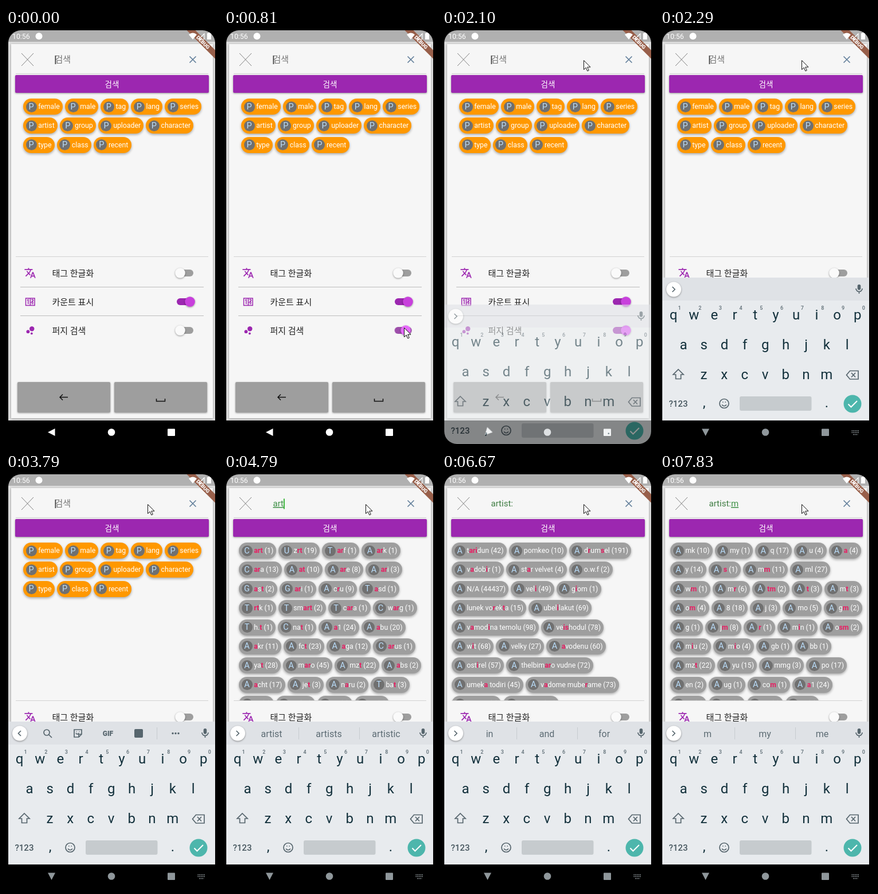
An HTML page for the animation above (8000 ms loop, 370 by 725 pixels).

```html
<!DOCTYPE html>
<html lang="ko">
<head>
<meta charset="utf-8">
<title>Tag search</title>
<style>
html, body { margin: 0; width: 100%; height: 100%; overflow: hidden; background: #000; }
body { font-family: Roboto, 'Noto Sans CJK KR', 'Noto Sans CJK', sans-serif; }
#device { position: absolute; left: 4px; top: 4px; width: 361px; height: 721px; border-radius: 22px; overflow: hidden; }
#stage { position: absolute; left: -4px; top: -4px; width: 370px; height: 725px; }
svg { position: absolute; left: 0; top: 0; }
.card { position: absolute; left: 9px; top: 28px; width: 352px; height: 652px; background: #f6f6f6; box-shadow: 0 1px 4px rgba(0,0,0,.3); }
.back { position: absolute; left: 4px; top: 24px; width: 361px; height: 660px; background: #dedede; overflow: hidden; }
.back .card { left: 5px; top: 4px; }
.raised { filter: drop-shadow(0 1px 1.5px rgba(0,0,0,.4)); }
.line { fill: none; stroke-linecap: butt; }

#lists { position: absolute; left: 9px; top: 116px; width: 352px; height: 282px; overflow: hidden; }
.list { position: absolute; top: 7px; white-space: nowrap; font-size: 12.3px; color: #fff; }
.row { display: flex; height: 33.4px; }
.chip { position: relative; height: 28px; line-height: 28px; padding: 0 5.2px 0 26.2px; margin-right: 4px; border-radius: 14px; background: #9e9e9e; box-shadow: 0 2px 4px rgba(0,0,0,.32); }
.tags .chip { background: #ff9800; }
.chip i { position: absolute; left: 4.5px; top: 4.5px; width: 19px; height: 19px; line-height: 19px; border-radius: 50%; background: #707070; color: #bbdefb; font-size: 14.5px; font-style: normal; text-align: center; }
.chip b { color: #e91e63; }

.key { font-size: 24px; text-anchor: middle; fill: #12303b; }
.num { font-size: 9px; font-weight: 500; text-anchor: middle; fill: #5c6b73; }
.tip { font-size: 16px; text-anchor: middle; fill: #5c6b73; }
.tool { fill: none; stroke: #56656d; stroke-width: 1.7; }

.anim { animation: 8s linear infinite; }
#mouse { animation-name: mouse; }
#thumb { animation-name: thumb; }
#track { animation-name: track; }
#kb { animation-name: slide; }
#navBack { animation-name: turn; transform-origin: 79.5px 704.5px; }
#nav { animation-name: dim; }
@keyframes mouse {
  0%, .74% { opacity: 0; transform: translate(337px, 689px); }
  .75% { opacity: 1; transform: translate(337px, 689px); animation-timing-function: ease-out; }
  6.375%, 10.2% { transform: translate(314px, 522px); animation-timing-function: ease-in-out; }
  18%, 18.9% { transform: translate(262px, 45px); }
  21.25%, 100% { opacity: 1; transform: translate(247px, 56px); }
}
@keyframes thumb {
  0%, 8.375% { transform: none; fill: #fafafa; animation-timing-function: ease-in-out; }
  11%, 100% { transform: translateX(17px); fill: #e040fb; }
}
@keyframes track {
  0%, 8.375% { transform: none; fill: #9e9e9e; }
  11%, 100% { transform: translateX(1px); fill: #9c27b0; }
}
@keyframes slide {
  0%, 23.75% { opacity: 0; transform: translateY(110px); }
  26.25%, 27.4% { opacity: .57; transform: translateY(47px); }
  28.625%, 100% { opacity: 1; transform: none; }
}
@keyframes turn {
  0%, 23.75% { transform: none; }
  28.625%, 100% { transform: rotate(-90deg); }
}
@keyframes dim {
  0%, 28.6% { fill: #fff; }
  28.625%, 100% { fill: #8f979b; }
}
</style>
</head>
<body>
<div id="device"><div id="stage">
  <div class="back"><div class="card"></div></div>

  <svg width="370" height="725">
    <rect x="4" y="4" width="361" height="20" fill="#b0b0b0"/>
    <g transform="translate(344 25) rotate(45)">
      <rect x="-40" y="-5.3" width="80" height="10.6" fill="#985f4a"/>
      <text y="3.2" font-size="9" font-weight="900" text-anchor="middle" fill="#fff">DEBUG</text>
    </g>
    <g fill="#fff">
      <text x="11" y="18.5" font-size="12.3">10:56</text>
      <circle cx="57.5" cy="14.2" r="6"/>
      <path d="M319 11.5Q326 5.5 333 11.5L326 20ZM351 9h2V8h3v1h2v11h-7z"/>
      <path d="M346 10V19.5H336.5Z" fill="none" stroke="#fff" stroke-width="1.2"/>
    </g>

    <g class="line">
      <path d="M27 44L48 66M48 44L27 66" stroke="#808080"/>
      <path d="M320.5 49.5L331.5 60.5M331.5 49.5L320.5 60.5" stroke="#64809c" stroke-width="1.7"/>
      <path d="M17 79.5H353M17 398.5H353" stroke="#d2d2d2"/>
      <path d="M25 451.5H345M25 501.5H345" stroke="#bcbcbc"/>
    </g>
    <rect class="raised" x="16" y="82" width="338" height="31" rx="2" fill="#9c27b0"/>
    <text x="185" y="102.5" font-size="13.5" text-anchor="middle" fill="#fff">검색</text>

    <g font-size="15" id="field" fill="#333"></g>

    <g font-size="15" fill="#212121">
      <text x="80.5" y="432.5">태그 한글화</text>
      <text x="80.5" y="482.5">카운트 표시</text>
      <text x="80.5" y="532.5">퍼지 검색</text>
    </g>
    <g fill="#9c27b0">
      <path transform="translate(31.5 416.5) scale(.88)" d="M12.87 15.07l-2.54-2.51.03-.03c1.74-1.94 2.98-4.17 3.71-6.53H17V4h-7V2H8v2H1v1.99h11.17C11.5 7.92 10.44 9.75 9 11.35 8.07 10.32 7.3 9.19 6.69 8h-2c.73 1.63 1.73 3.17 2.98 4.56l-5.09 5.02L4 19l5-5 3.11 3.11.76-2.04zM18.5 10h-2L12 22h2l1.12-3h4.75L21 22h2l-4.5-12zm-2.62 7l1.62-4.33L19.12 17h-3.24z"/>
      <path d="M34.5 471h15.5v12.5H34.5ZM42.3 471v12.5M37 474.5l1.7-1.2v8M44.2 474q3-2 3.4.5l-3.2 3.5h3.6M44.5 480.5h3.3" fill="none" stroke="#9c27b0" stroke-width="1.5"/>
      <circle cx="38.4" cy="529.2" r="2.9"/><circle cx="44.8" cy="532.4" r="1.9"/><circle cx="45.2" cy="524.2" r="4.2"/>
    </g>
    <g>
      <rect x="297" y="421" width="30" height="12" rx="6" fill="#9e9e9e"/>
      <circle class="raised" cx="304" cy="427" r="8.8" fill="#fafafa"/>
      <rect x="298" y="471" width="30" height="12" rx="6" fill="#9c27b0"/>
      <circle class="raised" cx="321" cy="477" r="8.8" fill="#c840dc"/>
      <rect class="anim" id="track" x="297" y="521" width="30" height="12" rx="6"/>
      <circle class="anim raised" id="thumb" cx="304" cy="527" r="8.8"/>
    </g>
    <g class="raised" fill="#9e9e9e">
      <rect x="20" y="617" width="162" height="53" rx="2"/>
      <rect x="189" y="617" width="162" height="53" rx="2"/>
    </g>
    <path d="M108 643.5H94M99 638.5L94 643.5L99 648.5M262.5 646V650.5H277.5V646" fill="none" stroke="#111" stroke-width="1.5"/>

    <rect x="0" y="684" width="370" height="41" fill="#000"/>
    <g class="anim" id="nav">
      <path class="anim" id="navBack" d="M73 704.5L85.5 698V711Z"/>
      <circle cx="184" cy="704.5" r="6.3"/>
      <rect x="282" y="698.5" width="13" height="12.5" rx="1"/>
      <path id="imeIcon" d="M334.500 702H348M334.500 705H348M337 708.500H345.500" fill="none" stroke="#8f979b" stroke-width="1.600" stroke-dasharray="1.700 1"/>
    </g>
  </svg>

  <div id="lists"></div>

  <svg width="370" height="725">
    <g class="anim" id="kb">
      <rect x="4" y="435" width="361" height="249" fill="#e8ebee"/>
      <rect x="4" y="435" width="361" height="40" fill="#dfe2e6"/>
      <circle cx="24" cy="455.5" r="13" fill="#fff" class="raised"/>
      <path class="tool" id="chevOpen" d="M21.5 451L26 455.5L21.5 460"/>
      <g id="tools">
        <path class="tool" d="M26 451L21.5 455.5L26 460"/>
        <path class="tool" d="M75 458L80 463M76 454a5 5 0 1 1-10 0a5 5 0 1 1 10 0"/>
        <path class="tool" d="M119 449h13v8l-5 5h-8zM127 462v-5h5M122 455q2.5 4 5 0M122.5 452.5h1M127.5 452.5h1"/>
        <text x="178" y="459.5" font-size="12" font-weight="900" text-anchor="middle" fill="#56656d">GIF</text>
        <rect x="224" y="448" width="15" height="15" rx="2" fill="#56656d"/>
        <path d="M263.5 445V466" stroke="#c6cbcf"/>
        <path d="M291 455.5h.01M296 455.5h.01M301 455.5h.01" stroke="#56656d" stroke-width="3.4" stroke-linecap="round"/>
      </g>
      <rect x="344.7" y="447" width="5.6" height="9.5" rx="2.8" fill="#56656d"/>
      <path class="tool" d="M342 454a5.5 5.5 0 0 0 11 0M347.5 459.5V463"/>
      <g id="tips"></g>
      <g id="keys"></g>
      <path class="tool" d="M32 595l9 9h-4.5v7.5h-9V604H23Z"/>
      <path class="tool" d="M331.5 597.5H346V612H331.5L325.5 604.7ZM334 601l7 7.5M341 601l-7 7.5"/>
      <text x="32" y="660" font-size="15" font-weight="500" text-anchor="middle" fill="#45555d">?123</text>
      <circle class="tool" cx="112" cy="654.5" r="8"/>
      <path class="tool" d="M108 656.5q4 4.5 8 0M109 652h1.5M113.5 652h1.5"/>
      <rect x="139" y="642" width="125.5" height="25" rx="3" fill="#c6cbce"/>
      <circle cx="336" cy="655" r="15.5" fill="#4db6ac"/>
      <path d="M328.5 655.5L333.5 660.5L344 650" fill="none" stroke="#fff" stroke-width="2"/>
    </g>
    <path class="anim" id="mouse" d="M.5 .5V16.5L4.2 13L6.8 19L9.3 17.9L6.7 12.1H12Z" fill="#fff" stroke="#111"/>
  </svg>
</div></div>

<script>
const LOOP = 8000;
const $ = id => document.getElementById(id);

// Make an element visible only inside the given [from, to) spans (ms).
function show(el, ...spans) {
  const times = [...new Set([0, ...spans.flat(), LOOP])];
  const seen = t => spans.some(([a, b]) => t >= a && t < b);
  const frames = times.map(t => ({
    offset: t / LOOP,
    visibility: seen(t) ? 'visible' : 'hidden',
    easing: 'steps(1, end)'
  }));
  el.animate(frames, { duration: LOOP, iterations: Infinity });
}

function add(parent, markup, ...spans) {
  parent.insertAdjacentHTML('beforeend', markup);
  if (spans.length) show(parent.lastElementChild, ...spans);
}

// Chip lists: rows by line, chips by "|", avatar letter first, *matched* letters.
function addList(text, left, span, kind = '') {
  const chip = s => `<span class="chip"><i>${s[0]}</i>${s.slice(1).replace(/\*(.+?)\*/g, '<b>$1</b>')}</span>`;
  const rows = text.trim().split('\n').map(r => `<div class="row">${r.trim().split('|').map(chip).join('')}</div>`);
  add($('lists'), `<div class="list ${kind}" style="left:${left - 9}px">${rows.join('')}</div>`, span);
}

const artList = `
C*art* (1)|Uz*rt* (19)|T*ar*f (1)|A*ar*k (1)
C*ar*a (13)|A*at* (10)|A*ar*e (8)|A*ar*i (3)
G*a*s*t* (2)|G*ar*i (1)|Ac*r*u (9)|T*a*sd (1)
T*rt*k (1)|Tsm*art* (2)|Tc*ar*a (1)|Cw*ar*g (1)
Th.*t* (1)|Cna*t* (1)|A*a*1 (24)|A*a*bu (20)
A*a*kr (11)|Afc*t* (23)|A*a*ga (12)|C*ar*us (1)
Aya*t* (28)|Am*ar*o (45)|Amz*t* (22)|A*a*bs (2)
A*a*cht (17)|Aje*t* (3)|An*a*ru (2)|Tba*t* (3)
Aa*t* (1)|Aa*r* (12)|A*r*e (1)|Tt*a* (1)`;

const marked = re => artList.replace(/\*/g, '').replace(/^.*$/gm, row =>
  row.split('|').map(s => s[0] + s.slice(1).replace(re, '*$&*')).join('|'));

addList(`
Pfemale|Pmale|Ptag|Plang|Pseries
Partist|Pgroup|Puploader|Pcharacter
Ptype|Pclass|Precent`, 30, [0, 4420], 'tags');
addList(marked(/a/), 26, [4420, 4570]);
addList(marked(/a?r/), 26, [4570, 4790]);
addList(artList, 26, [4790, 5230]);
addList(`
At*ari*dun (42)|Apomkeo (10)|Ad*r*um*s*el (191)
Av*a*dob*i*r (1)|Ast*a*r velvet (4)|Ao.w.f (2)
AN/A (44437)|Avel*i* (49)|Ag*i*om (1)
Alunek vo*r*ek*t*a (15)|Aubel*i*lakut (69)
Av*a*mod*i*na temolu (98)|Ave*is*hodul (78)
Aw*i*t (68)|Avelky (27)|A*a*vodenu (60)
Aost*i*rel (57)|Athelbim*ar*o vudne (72)
Aumek*a* todiri (45)|Av*a*dome mube*r*ame (73)
Abesolu (3)|Apilv*a*ret (12)`, 17, [5230, 7400]);
addList(`
Amk (10)|Amy (1)|Aq (17)|Au (4)|A*a* (4)
Ay (14)|A*s* (1)|Am*m* (11)|Aml (27)
Aw*m* (1)|Am*r* (6)|A*tm* (2)|A*t* (3)|Am*t* (3)
Ao*m* (4)|A8 (18)|Aj (3)|Amo (5)|Ag*m* (2)
Ag (1)|Aj*m* (8)|A*r* (1)|Am*i*n (1)|Ao*sm* (2)
Am*i*u (2)|Am*i*o (4)|Agb (1)|Abb (1)
Amz*t* (22)|Ayu (15)|Ammg (3)|Apo (17)
Aen (2)|Aug (1)|Aco*m* (1)|A*a*1 (24)
Aka (2)|Ane (1)|Avo (3)|Alu (5)`, 18, [7400, LOOP]);

// Search field: text, then caret positions with their blinking.
const field = $('field');
const typed = (s, ...span) => add(field, `<text x="85.5" y="60">${s}</text>`, span);
const green = s => `<tspan fill="#3d8f45" text-decoration="underline">${s}</tspan>`;
const done = '<tspan fill="#3f7d43">artist:</tspan>';
typed('<tspan fill="#757575">검색</tspan>', 0, 4350);
typed(green('a'), 4350, 4500);
typed(green('ar'), 4500, 4700);
typed(green('art'), 4700, 5070);
typed(done, 5070, 7340);
typed(done + green('m'), 7340, LOOP);

const caret = (x, y, h, fill, ...spans) =>
  add(field, `<rect x="${x}" y="${y}" width="1.8" height="${h}" fill="${fill}"/>`, ...spans);
caret(85.5, 48, 15, '#444', [0, 60], [510, 1000], [1540, 2340], [2810, 3300], [3790, 4280]);
caret(94, 46.5, 18, '#2bb02b', [4350, 4500]);
caret(99, 46.5, 18, '#2bb02b', [4500, 4700]);
caret(104, 46.5, 18, '#2bb02b', [4700, 5070]);
caret(123.8, 46.5, 18, '#43a047', [5070, 5690], [6180, 6670], [7160, 7340]);
caret(137, 46.5, 18, '#43a047', [7340, 7830]);

// Keyboard
const keys = $('keys');
[['qwertyuiop', 23.5, 507.5], ['asdfghjkl', 41, 559.5], ['zxcvbnm', 76.5, 611.5]].forEach(([row, x, y], r) =>
  [...row].forEach((c, i) => {
    const kx = x + i * 35.7;
    add(keys, `<text class="key" x="${kx}" y="${y}">${c}</text>`);
    if (!r) add(keys, `<text class="num" x="${kx + 10.5}" y="491">${(i + 1) % 10}</text>`);
  }));
add(keys, '<text class="key" x="77" y="661">,</text>');
add(keys, '<text class="key" x="291" y="661">.</text>');

function addTips(words, ...span) {
  const text = words.split(' ').map((w, i) => `<text class="tip" x="${83 + i * 100}" y="461.5">${w}</text>`).join('');
  add($('tips'), `<g>${text}<path d="M130.5 445V466M236.5 445V466" stroke="#c6cbcf"/></g>`, span);
}
addTips('a are as', 4350, 4500);
addTips('are art at', 4500, 4790);
addTips('artist artists artistic', 4790, 5150);
addTips('in and for', 5150, 7400);
addTips('m my me', 7400, LOOP);

show($('tools'), [2340, 4350]);
show($('chevOpen'), [0, 2340], [4350, LOOP]);
show($('imeIcon'), [2290, LOOP]);

// One shared clock for every animation.
document.getAnimations().forEach(a => { a.startTime = 0; });
</script>
</body>
</html>
```
